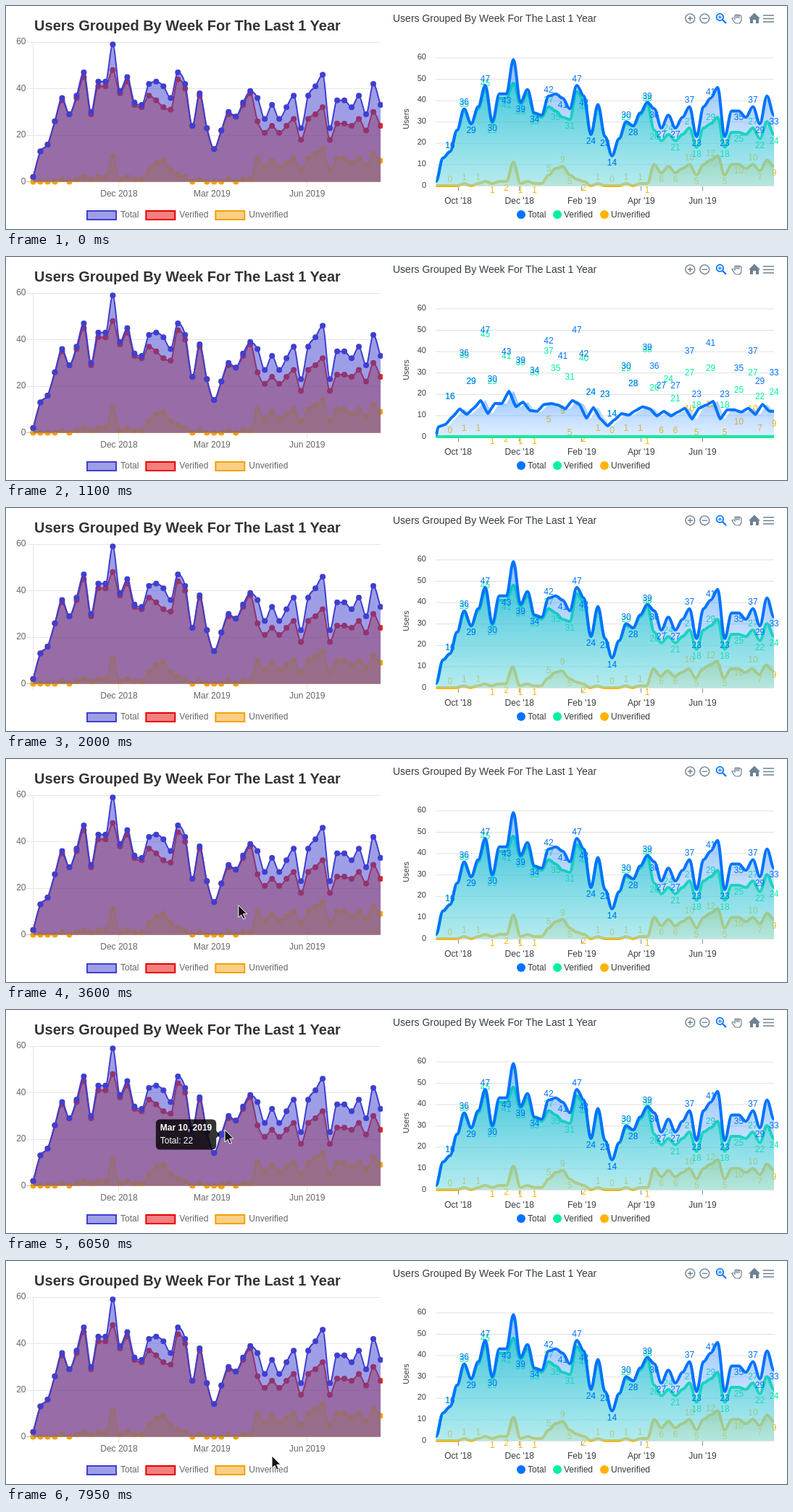
Write an HTML page that moves like this. It is 1078x309 px and loops after 8000 ms.

```html
<!DOCTYPE html>
<html lang="en">
<head>
<meta charset="utf-8">
<title>Users per week</title>
<style>
  html, body { margin: 0; width: 100%; height: 100%; overflow: hidden; background: #fff; }
  svg { display: block; width: 1078px; height: 309px; font: 12px "Liberation Sans", Arial, sans-serif; }
  .a { fill: #666; }
  .b { fill: #373d3f; }
  .mid { text-anchor: middle; }
  .end { text-anchor: end; }
  .small { font-size: 11px; }
  .icon { fill: none; stroke: #6e8192; stroke-width: 1.4; }
</style>
</head>
<body>
<svg viewBox="0 0 1078 309">
  <defs id="defs"><clipPath id="half"><rect width="520" height="309"/></clipPath></defs>
  <g id="left" clip-path="url(#half)"></g>
  <g id="right">
    <g class="icon">
      <circle cx="944.3" cy="17.3" r="6.4"/><path d="M941 17.3h7M944.3 14v7"/>
      <circle cx="964.3" cy="17.3" r="6.4"/><path d="M961 17.3h7"/>
      <g stroke="#0073ff">
        <circle cx="985.4" cy="15.4" r="4.7" stroke-width="1.8"/>
        <path d="M989 19l5 5" stroke-width="2.2"/>
        <path d="M983 15.4h5M985.4 13v5" stroke-width="1"/>
      </g>
      <path stroke-width="1.2" d="M1006 19v-6q1-2 2 0q1-2 2 0q1-2 2 0q1-1 3 1v6q-1 4-4 4h-3q-2 0-3-2l-3-5q1-1 3 0M1008 12v5M1010 12v5M1012 12v5"/>
      <path stroke-width="1.7" d="M1045 13h15m-15 4.500h15m-15 4.500h15"/>
    </g>
    <path fill="#6e8192" d="M1025 17.500l8-8 8 8h-2v6.500h-4v-5h-4v5h-4v-6.500z"/>
  </g>
  <g id="tip" fill="#fff">
    <path id="tipBox" fill="#000" fill-opacity=".8"/>
    <text id="tipDate" font-weight="bold"></text>
    <text id="tipValue"></text>
  </g>
  <path id="cursor" d="M0 0V17l4-3.600 2.700 6 2.700-1.200-2.700-6H12z" fill="#111" stroke="#fff"/>
</svg>
<script>
const LOOP = 8000, STEP = 50;

// Weekly totals; the other two series follow from them
const total = [2,13,16,26,36,29,37,47,30,43,43,59,39,45,34,33,42,43,41,36,47,42,24,38,23,
  14,22,30,28,34,39,36,27,33,27,32,37,23,37,41,46,23,35,35,32,37,29,42,33];
const LAST = total.length - 1;
const bump = (i, at, height, slope) => Math.max(0, height - slope * Math.abs(i - at));
const unverified = total.map((v, i) => {
  if (i > 30) return Math.round((v - 10) * .38);
  const few = Math.max(0, Math.floor((v - 20) / 10));
  return few + Math.round(bump(i, 11, 8, 8) + bump(i, 17.6, 8, 3));
});
const verified = total.map((v, i) => v - unverified[i]);
const series = [
  { name: 'Total', data: total, a: '#3f3fcf', ink: '#3f3fcf', wash: '#3f3fcf', b: '#0073ff', soft: '#80b9ff', alpha: [.45, .25] },
  { name: 'Verified', data: verified, a: '#e80000', ink: '#e52a10', wash: '#e33b00', b: '#00f0a0', soft: '#80f8d0', alpha: [.6, .45] },
  { name: 'Unverified', data: unverified, a: '#f5a00a', ink: '#f5a00a', wash: '#f5a00a', b: '#ffb300', soft: '#ffd980', alpha: [.5, .3] }
];
const [all, yes, no] = series;

const DAY = 864e5, firstDay = Date.UTC(2018, 8, 9);
const week = date => (date - firstDay) / DAY / 7;
const format = (date, options) => new Date(date).toLocaleDateString('en-US', { timeZone: 'UTC', ...options });
const monthName = date => format(date, { month: 'short' });
const year = date => new Date(date).getUTCFullYear();

const $ = id => document.getElementById(id);
function add(parent, tag, attrs, text) {
  const el = document.createElementNS('http://www.w3.org/2000/svg', tag);
  for (const k in attrs) el.setAttribute(k, attrs[k]);
  if (text !== undefined) el.textContent = text;
  parent.appendChild(el);
  return el;
}
const label = (g, x, y, text, cls, more) => add(g, 'text', { x, y, class: cls, ...more }, text);
const line = (g, d, stroke, width = 1) => add(g, 'path', { d, stroke, 'stroke-width': width, fill: 'none' });
const curve = (...n) => 'C' + n.map(v => v.toFixed(2)).join(' ');

// Left chart
const left = $('left');
const lx = i => 37.5 + i * 9.99, ly = v => 243.5 - v * 3.225;

function monotone(data) {
  const dx = lx(1) - lx(0), y = data.map(ly);
  const d = y.slice(1).map((v, i) => (v - y[i]) / dx);
  const m = y.map((_, i) => i === 0 ? d[0] : i === LAST ? d[LAST - 1]
    : d[i - 1] * d[i] <= 0 ? 0 : (d[i - 1] + d[i]) / 2);
  d.forEach((slope, i) => {
    if (slope === 0) { m[i] = m[i + 1] = 0; return; }
    const k = 3 * Math.abs(slope) / Math.hypot(m[i], m[i + 1]);
    if (k < 1) { m[i] *= k; m[i + 1] *= k; }
  });
  let path = `M${lx(0)} ${y[0]}`;
  for (let i = 1; i <= LAST; i++) {
    path += curve(lx(i - 1) + dx / 3, y[i - 1] + m[i - 1] * dx / 3,
      lx(i) - dx / 3, y[i] - m[i] * dx / 3, lx(i), y[i]);
  }
  return path;
}

label(left, 250.5, 34, 'Users Grouped By Week For The Last 1 Year', 'mid',
  { 'font-size': 20, 'font-weight': 'bold', fill: '#333' });
for (let v = 0; v <= 60; v += 20) {
  const y = Math.floor(ly(v)) + .5;
  line(left, `M28 ${y}H517`, v ? '#e5e5e5' : '#bfbfbf');
  label(left, 27.5, Math.round(ly(v) + 3.4), v, 'a end');
}
line(left, 'M37.5 50V252', '#e5e5e5');
for (let m = 11; m < 18; m += 3) {
  const date = Date.UTC(2018, m, 1), x = lx(week(date));
  line(left, `M${Math.floor(x) + .5} 244V252`, '#e5e5e5');
  label(left, x, 264, `${monthName(date)} ${year(date)}`, 'a mid');
}
[yes, no, all].forEach(s => {
  const path = monotone(s.data);
  add(left, 'path', { d: `${path}V${ly(0)}H${lx(0)}Z`, fill: s.wash, 'fill-opacity': .5 });
  line(left, path, s.ink, 2);
  s.dots = s.data.map((v, i) => add(left, 'circle', { cx: lx(i), cy: ly(v), r: 4, fill: s.ink }));
});
[112, 193.3, 289.3].forEach((x, i) => {
  const s = series[i];
  add(left, 'rect', { x, y: 284, width: 40, height: 12, fill: s.a, 'fill-opacity': .5, stroke: s.a, 'stroke-width': 2 });
  label(left, x + 46, 293, s.name, 'a');
});

// Right chart
const right = $('right');
const gap = 9.72, base = 249, unit = 2.96;
const rx = i => 593.5 + i * gap, ry = v => base - v * unit;

label(right, 534, 21.5, 'Users Grouped By Week For The Last 1 Year', 'b', { 'font-size': 14 });
label(right, 0, 0, 'Users', 'b mid small', { transform: 'translate(556 156.5) rotate(-90)' });
for (let v = 0; v <= 60; v += 10) {
  line(right, `M593 ${ry(v) + .5}H1060`, '#e0e0e0');
  label(right, 580, ry(v) + 2.6, v, 'b end small');
}
for (let m = 9; m < 18; m += 2) {
  const date = Date.UTC(2018, m, 1), x = rx(week(date));
  line(right, `M${Math.floor(x) + .5} 250V256`, '#78909c');
  label(right, x, 274, `${monthName(date)} '${year(date) % 100}`, 'b mid');
}
[711, 761, 826].forEach((x, i) => {
  add(right, 'circle', { cx: x, cy: 289, r: 6, fill: series[i].b });
  label(right, x + 9, 293, series[i].name, 'b');
});

// Value labels: above a rise, below otherwise; crowded ones are skipped
function valueLabels(s) {
  let last = 0, lastY = base;
  s.data.forEach((v, i) => {
    if (!i) return;
    let y = ry(v) + (v > s.data[i - 1] ? -9 : 9);
    if (y > 256) y -= 18;
    if (i - last < 2 && y <= lastY + 16) return;
    label(right, rx(i), y + 4, v, 'mid', { fill: s.b });
    last = i;
    lastY = y;
  });
}
[no, yes, all].forEach(s => {
  const grad = add($('defs'), 'linearGradient', { id: 'fill' + s.name, x2: 0, y2: 1 });
  [s.b, s.soft].forEach((c, i) => add(grad, 'stop', { offset: i, 'stop-color': c, 'stop-opacity': s.alpha[i] }));
  s.area = add(right, 'path', { fill: `url(#fill${s.name})` });
  s.line = line(right, '', s.b, 4);
  valueLabels(s);
});

// The line slides in from one step to the left; the area only rises
function smooth(data, p, slide) {
  const pts = data.map((v, i) => [rx(i) - (i && slide ? (1 - p) * gap : 0), ry(v * p)]);
  if (slide) pts.push([rx(LAST), pts[LAST][1]]);
  let path = `M${pts[0]}`;
  for (let i = 1; i < pts.length; i++) {
    const [x0, y0] = pts[i - 1], [x, y] = pts[i], k = Math.min(.35 * gap * p, x - x0);
    path += curve(x0 + k, y0, x - k, y, x, y);
  }
  return path;
}

function progress(t, k) {
  if (t < 50) return 1;
  const pos = Math.min(1, Math.max(0, (t - 772 - 302 * k) / 800));
  return (1 - Math.cos(pos * Math.PI)) / 2;
}

function drawRight(t) {
  series.forEach((s, k) => {
    const p = progress(t, k);
    if (p === s.shown) return;
    s.shown = p;
    s.line.setAttribute('d', smooth(s.data, p, true));
    s.area.setAttribute('d', `${smooth(s.data, p, false)}V${base}H${rx(0)}Z`);
  });
}

// Pointer moves: begin, end, goal, and the control point of a bent path
const moves = [
  { t: [3000, 3300], to: [358, 222] },
  { t: [3400, 3800], to: [257, 122], bend: [334, 233] },
  { t: [3800, 3950], to: [272, 171] },
  { t: [4050, 4700], to: [288, 199], bend: [330, 215] },
  { t: [5150, 5650], to: [297, 170] },
  { t: [6000, 6050], to: [302, 166] },
  { t: [6050, 6850], to: [482, 173], bend: [390, 100] },
  { t: [6850, 7150], to: [508, 179] },
  { t: [7300, 7950], to: [367, 270], bend: [315, 124] }
];
function pointer(t) {
  let at = [465, 314];
  for (const { t: [begin, end], to, bend } of moves) {
    if (t <= begin) break;
    const f = Math.min(1, (t - begin) / (end - begin)), g = 1 - f, from = at;
    at = to.map((v, i) => {
      const c = bend ? bend[i] : (from[i] + v) / 2;
      return g * g * from[i] + 2 * f * g * c + f * f * v;
    });
  }
  return at;
}

const show = (id, on) => { $(id).style.display = on ? '' : 'none'; };
const hovered = t => t >= 4450 && t < 5350 ? 25 : t >= 5400 && t < 6100 ? 26 : -1;
let active = -1;
function hover(i) {
  if (i === active) return;
  const size = (k, r) => k >= 0 && series.forEach(s => s.dots[k].setAttribute('r', r));
  size(active, 4);
  size(i, 5);
  active = i;
  show('tip', i >= 0);
  if (i < 0) return;
  const put = (id, text, x, y) => {
    $(id).textContent = text;
    $(id).setAttribute('x', x);
    $(id).setAttribute('y', y);
  };
  const y = ly(total[i]), r = lx(i) - 7;
  const date = format(firstDay + i * 7 * DAY, { month: 'short', day: 'numeric', year: 'numeric' });
  put('tipDate', date, 0, y - 5.5);
  const l = r - 12 - $('tipDate').getComputedTextLength();
  put('tipDate', date, l + 6, y - 5.5);
  put('tipValue', 'Total: ' + total[i], l + 6, y + 12.5);
  $('tipBox').setAttribute('d', `M${l + 6} ${y - 21}H${r - 6}q6 0 6 6V${y - 5}l5 5-5 5V${y + 15}q0 6-6 6` +
    `H${l + 6}q-6 0-6-6V${y - 15}q0-6 6-6z`);
}

function draw(t) {
  show('left', t < 50 || t >= 700);
  show('right', t < 50 || t >= 750);
  drawRight(t >= 1400 && t < 2000 ? 1400 : t);
  hover(hovered(t));
  show('cursor', t >= 3050);
  $('cursor').setAttribute('transform', `translate(${pointer(t).map(v => v.toFixed(1))})`);
}

show('tip', false);
const start = performance.now();
function tick() {
  draw(Math.floor((performance.now() - start) % LOOP / STEP) * STEP);
  requestAnimationFrame(tick);
}
tick();
</script>
</body>
</html>
```
